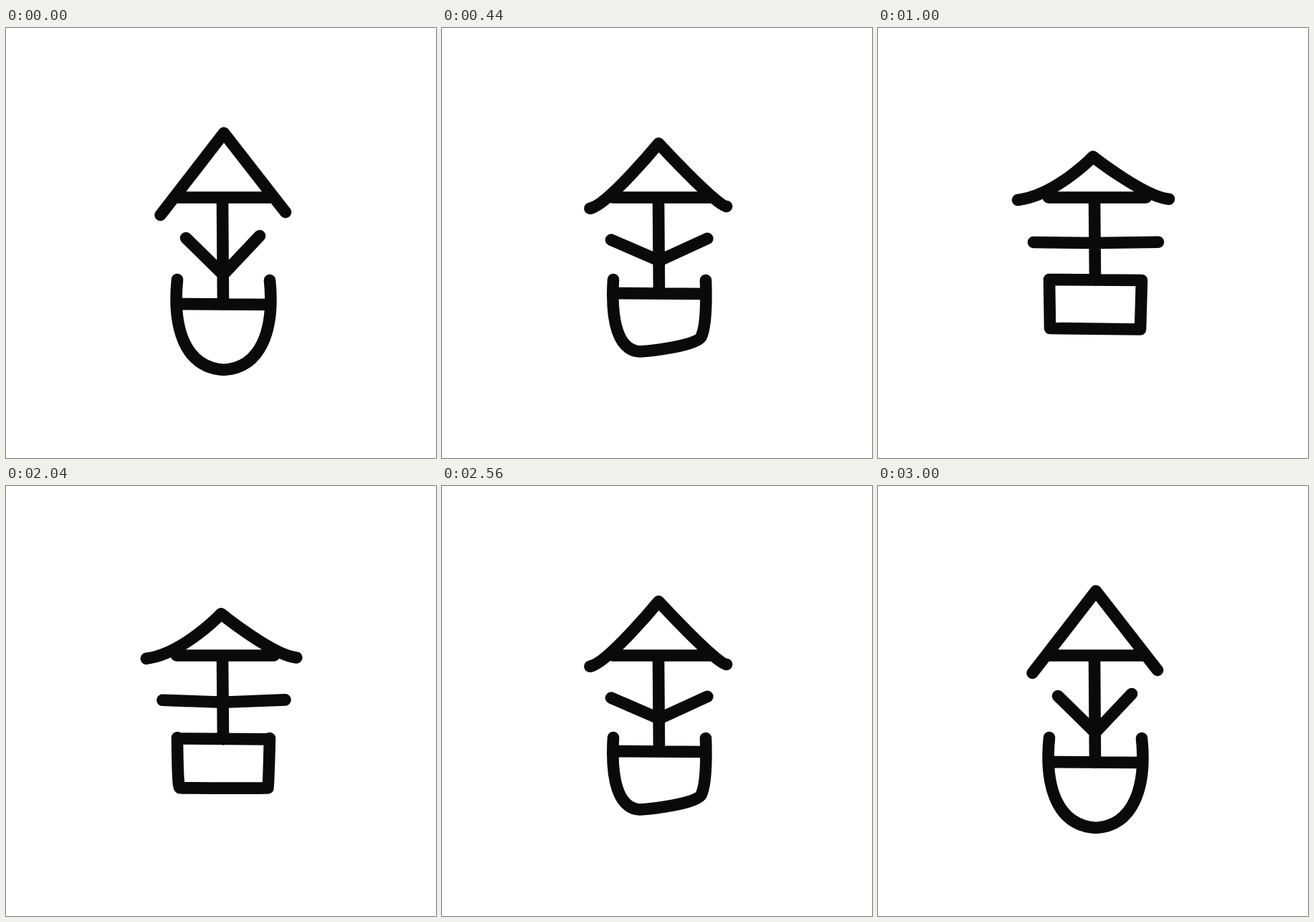
Animation, 600 px wide and 600 px high, one loop 4000 ms. Source, as an HTML page:

```html
<!DOCTYPE html>
<html lang="en">
<head>
<meta charset="utf-8">
<title>Glyph morph</title>
<style>
html, body { margin: 0; width: 100%; height: 100%; overflow: hidden; background: #fff; }
svg { display: block; width: 100%; height: 100%; }
</style>
</head>
<body>
<svg viewBox="0 0 600 600">
  <path id="glyph" fill="none" stroke="#0a0a0a" stroke-width="16.6" stroke-linecap="round" stroke-linejoin="round"/>
</svg>
<script>
const LOOP = 4000, MORPH = 1000, BACK = 2000, STEP = 40;
const glyph = document.getElementById('glyph');

const clamp = v => Math.min(1, Math.max(0, v));
const mix = ([x, y], [u, v], k) => [x + (u - x) * k, y + (v - y) * k];
const mid = (a, b) => mix(a, b, 0.5);
const mirror = ([x, y]) => [607 - x, y];

const line = (...pts) => 'M' + pts.join('L');
const curve = (...pts) => 'C' + pts.join(' ');

// Splits a cubic into two halves that share their middle point.
function split(a, b, c, d) {
  const ab = mid(a, b), bc = mid(b, c), cd = mid(c, d);
  const abc = mid(ab, bc), bcd = mid(bc, cd);
  return [ab, abc, mid(abc, bcd), bcd, cd];
}

// Two curved eaves that meet at the apex; straight while p is 0.
function roof(p) {
  const apex = mix([304, 146.6], [300, 179.6], p);
  const left = mix([215.5, 261], [195, 240], p);
  const right = mix([390, 257], [406, 238.7], p);
  const sagL = mix([218, 258], [248, 233.5], p);
  const sagR = mix([390, 257], [372, 236], p);
  return 'M' + left + curve(sagL, apex, apex) + curve(apex, sagR, right);
}

// A symmetric bowl whose right side bends in two to become a box.
const lip = [239, 351], lipR = [368, 352], base = [304, 477];
const side = [232, 421], belly = [251, 474];
const cornerL = [240, 419], cornerR = [366, 420.5];
const [r1, r2, r3, r4, r5] = split(base, mirror(belly), mirror(side), lipR);

function bowl(p) {
  const edge = (a, b) => mix(a, b, 0.68);
  const bottom = mix(base, cornerL, p);
  const toCorner = pt => mix(pt, cornerR, p);
  return 'M' + lip +
    curve(mix(side, edge(lip, cornerL), p), mix(belly, cornerL, p), bottom) +
    curve(mix(r1, cornerL, p), toCorner(r2), toCorner(r3)) +
    curve(toCorner(r4), mix(r5, edge(lipR, cornerR), p), lipR);
}

function branches(p) {
  return line(
    mix([251, 293], [217, 299], p),
    mix([303, 344], [303, 300], p),
    mix([354, 290], [391, 298.7], p)
  );
}

function draw(ms) {
  const t = Math.floor((ms % LOOP) / STEP) * STEP;
  const p = clamp(t / MORPH) - clamp((t - BACK) / MORPH);
  const lift = 34 * (1 - p);
  const beam = line([238, 236.5], [374, 236.5]);
  const stem = line([302, 238], [303, 352 + lift]);
  const rim = line([239, 351 + lift], [368, 352 + lift]);
  glyph.setAttribute('d', roof(p) + beam + stem + branches(p) + bowl(p) + rim);
}

const start = performance.now();
function tick() {
  draw(performance.now() - start);
  requestAnimationFrame(tick);
}
tick();
</script>
</body>
</html>
```
